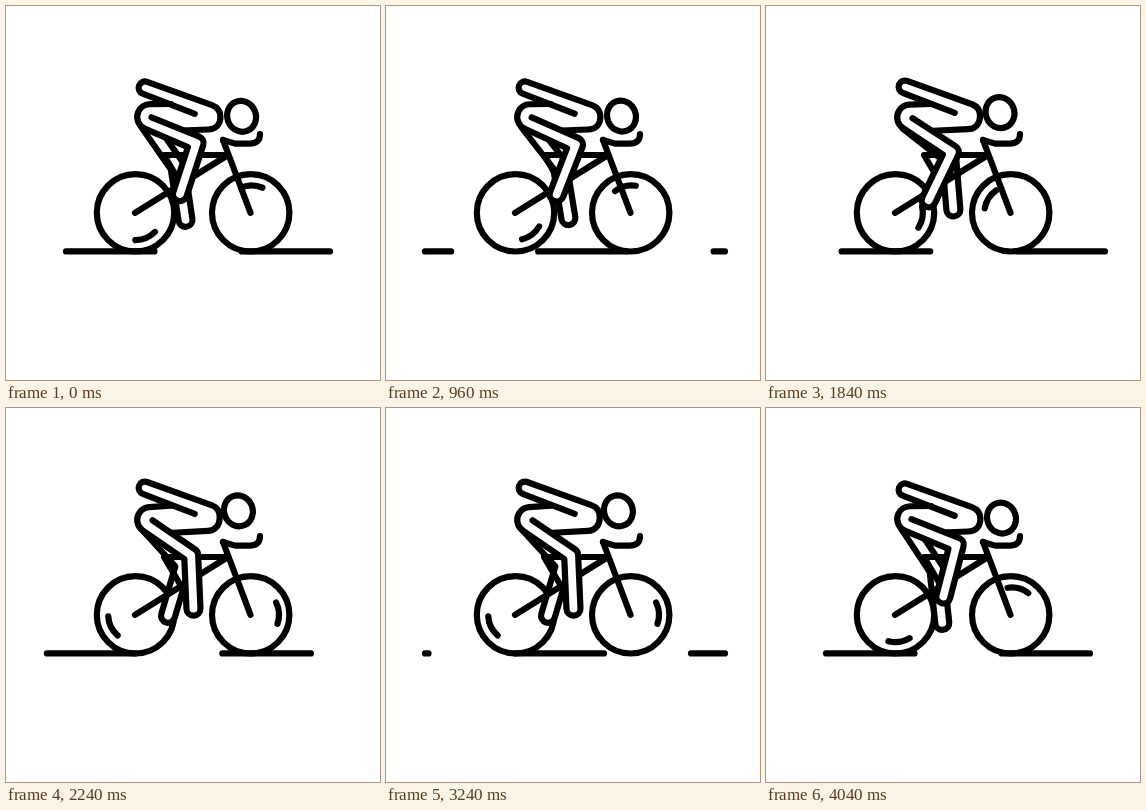
An HTML page with a canvas for the animation above (4.08 s loop, 374 by 374 pixels).

```html
<!DOCTYPE html>
<html lang="en">
<head>
<meta charset="utf-8">
<title>Cyclist</title>
<style>
html, body { margin: 0; width: 100%; height: 100%; overflow: hidden; background: #fff; }
canvas { display: block; }
</style>
</head>
<body>
<canvas id="stage" width="374" height="374"></canvas>
<script>
const ctx = document.getElementById('stage').getContext('2d');
const TAU = Math.PI * 2, Q = Math.PI / 2;
const LOOP = 4080, STEP = 40, TURN = 1000;
const HIP = [141, 117], CRANK = [174, 201.5], LIMB = 53.5, HALF = 7;

const rad = deg => deg * Math.PI / 180;
const polar = (p, r, a) => [p[0] + r * Math.cos(a), p[1] + r * Math.sin(a)];

function line(...points) {
  ctx.beginPath();
  points.forEach(p => ctx.lineTo(...p));
  ctx.stroke();
}

function ground(t) {
  const period = 175.5, dash = 88.5, left = 39, right = 339, y = 245.4;
  const shift = t / 2020 * period;
  for (let i = -1; i < 5; i++) {
    const x = 60 + i * period - shift;
    const a = Math.max(left, x), b = Math.min(right, x + dash);
    if (a < b) line([a, y], [b, y]);
  }
}

function arc(x, y, r, from, to) {
  ctx.beginPath();
  ctx.arc(x, y, r, from, to);
  ctx.stroke();
}

function wheel(x, markX, mark) {
  arc(x, 206.8, 38.7, 0, TAU);
  arc(markX, 206.8, 27.3, mark - rad(23), mark + rad(23));
}

function frame() {
  line([129, 206.8], [222, 149], [158, 149], [175, 178]);
  line([244.5, 206.8], [217, 134]);
  ctx.beginPath();
  ctx.moveTo(217, 134);
  ctx.lineTo(229, 137.6);
  ctx.lineTo(243, 137.6);
  ctx.quadraticCurveTo(254, 138, 254, 128);
  ctx.stroke();
}

// Outlined two-part limb; the knee follows from hip and pedal positions.
function leg(pedal, finish) {
  const foot = polar(CRANK, 13.5, pedal);
  const dx = foot[0] - HIP[0], dy = foot[1] - HIP[1];
  const bend = Math.acos(Math.min(1, Math.hypot(dx, dy) / 2 / LIMB));
  const mid = Math.atan2(dy, dx), a = mid - bend, b = mid + bend;
  const knee = polar(HIP, LIMB, a);
  ctx.beginPath();
  ctx.moveTo(...polar(polar(HIP, HALF, a - Q), 2, a));
  ctx.arc(...knee, HALF, a - Q, b - Q);
  ctx.arc(...foot, HALF, b - Q, b + Q);
  ctx.lineTo(...polar(knee, HALF / Math.cos(bend), mid + Q));
  if (finish) finish(a + Q);
  else ctx.lineTo(...polar(HIP, HALF, a + Q));
  ctx.fill();
  ctx.stroke();
}

function torso(c) {
  const y = 2 * c, low = 122.8 + 0.7 * c, side = 213.7 + 0.7 * c;
  ctx.beginPath();
  [[146, 101], [200, 100], [205, low], [162, 125], [145, 118]].forEach(p => ctx.lineTo(...p));
  ctx.fill();
  ctx.beginPath();
  ctx.moveTo(188.7, 105.8 + y);
  ctx.arc(138.9, 79.8 + y, 6.3, rad(110.5), rad(290.5));
  ctx.lineTo(206, 97.2 + y);
  ctx.bezierCurveTo(211.5, 99.3 + y, side, 104 + y, side, 109 + y);
  ctx.bezierCurveTo(side, 117 + y, 209, low, 202, low);
  ctx.lineTo(162, 125);
  ctx.fill();
  ctx.stroke();
}

function head(c) {
  ctx.beginPath();
  ctx.ellipse(232.2 + 3.4 * c, 102.3 + 8 * c, 14.3, 15.6, rad(-20), 0, TAU);
  ctx.stroke();
}

function draw(t) {
  const spin = t / TURN * TAU, c = Math.cos(spin);
  ctx.fillStyle = '#fff';
  ctx.fillRect(0, 0, 374, 374);
  ctx.strokeStyle = '#000';
  ctx.lineWidth = 6.2;
  ctx.lineCap = ctx.lineJoin = 'round';

  ground(t);
  wheel(129.5, 129.5, rad(67.5) + spin);
  wheel(244.7, 245.7, rad(270) + spin);
  leg(rad(66) + spin);
  frame();
  torso(c);
  leg(rad(-90) + spin, start => {
    ctx.arc(144, 112 - c, 12.8, start, rad(265 + 5 * c));
    ctx.lineTo(165, 97.6 + 0.4 * c);
  });
  head(c);
}

function tick() {
  draw(Math.floor(performance.now() % LOOP / STEP) * STEP);
  requestAnimationFrame(tick);
}
tick();
</script>
</body>
</html>
```
